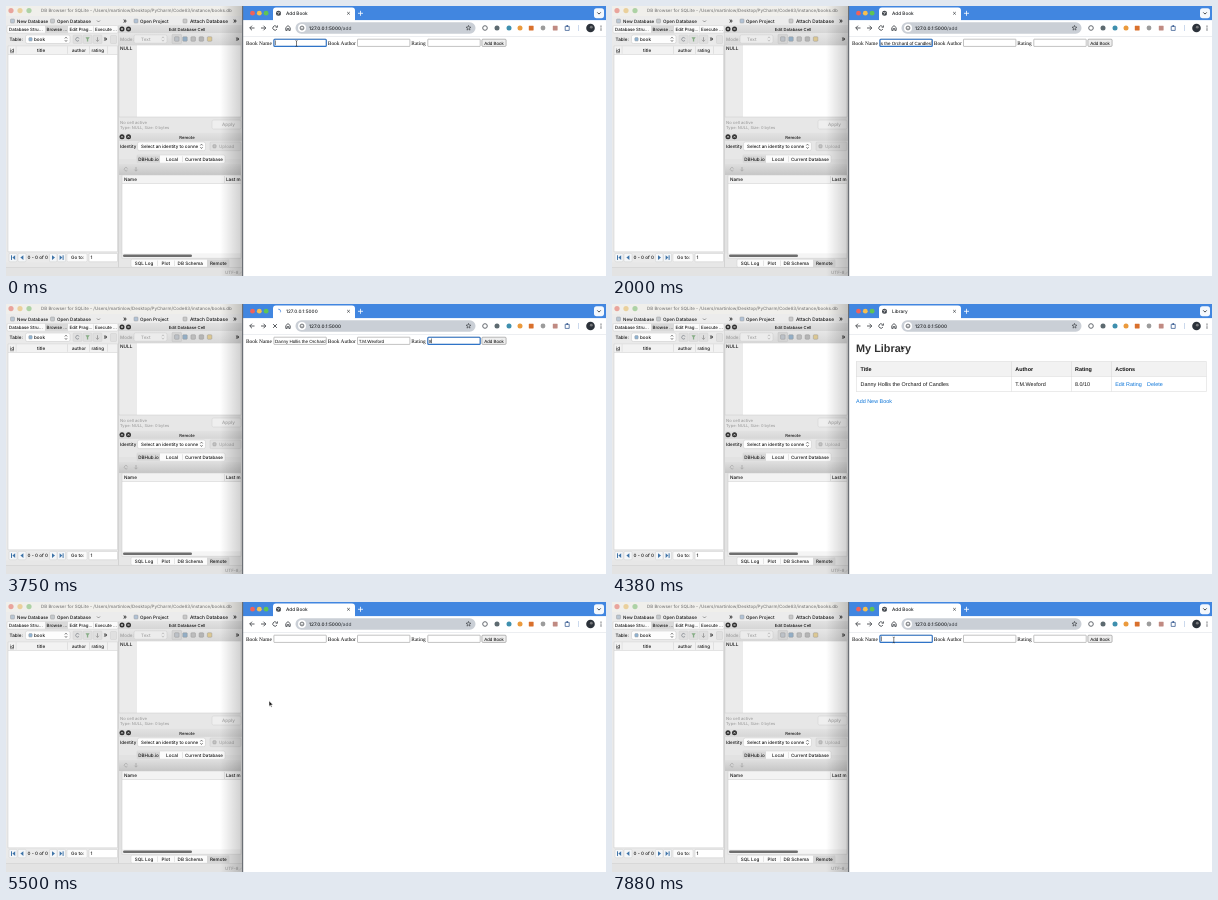
These frames come from a looping animation (600x270 px, 8 s). An HTML page with a canvas:

```html
<!DOCTYPE html>
<html lang="en">
<head>
<meta charset="utf-8">
<title>Add Book</title>
<style>
html, body { margin: 0; width: 100%; height: 100%; overflow: hidden; background: #fff; }
canvas { display: block; width: 600px; height: 270px; }
</style>
</head>
<body>
<canvas id="stage" width="600" height="270"></canvas>
<script>
const ctx = document.getElementById('stage').getContext('2d');
const LOOP = 8000;
const UI = 'Inter, sans-serif';
const ARIAL = '"Liberation Sans", Arial, sans-serif';
const SERIF = '"Liberation Serif", "Times New Roman", serif';

const BOOK = 'Danny Hollis the Orchard of Candles';
const AUTHOR = 'T.M.Wexford';
const HOST = '127.0.0.1:5000';

// Moments of the story, in ms
const T = { author: 2150, rating: 3300, submit: 3640, library: 4020, click: 5450, focus: 6600 };

// ---------- drawing helpers ----------
function rect(x, y, w, h, fill) {
  ctx.fillStyle = fill;
  ctx.fillRect(x, y, w, h);
}

function fade(x0, y0, x1, y1, from, to) {
  const g = ctx.createLinearGradient(x0, y0, x1, y1);
  g.addColorStop(0, from);
  g.addColorStop(1, to);
  return g;
}

function box(x, y, w, h, r, fill, stroke, lw = 0.6) {
  ctx.beginPath();
  ctx.roundRect(x, y, w, h, r);
  if (fill) { ctx.fillStyle = fill; ctx.fill(); }
  if (stroke) { ctx.strokeStyle = stroke; ctx.lineWidth = lw; ctx.stroke(); }
}

function frame(x, y, w, h) {
  ctx.strokeStyle = '#c8c8c8';
  ctx.lineWidth = 0.5;
  ctx.strokeRect(x, y, w, h);
}

function dot(x, y, r, fill) {
  ctx.beginPath();
  ctx.arc(x, y, r, 0, Math.PI * 2);
  ctx.fillStyle = fill;
  ctx.fill();
}

function ring(x, y, r, color, lw = 0.7, from = 0, to = Math.PI * 2) {
  ctx.beginPath();
  ctx.arc(x, y, r, from, to);
  ctx.strokeStyle = color;
  ctx.lineWidth = lw;
  ctx.stroke();
}

function path(points, color, lw = 0.8, fill) {
  ctx.beginPath();
  for (let i = 0; i < points.length; i += 2) ctx.lineTo(points[i], points[i + 1]);
  if (fill) { ctx.closePath(); ctx.fillStyle = fill; ctx.fill(); }
  if (color) { ctx.strokeStyle = color; ctx.lineWidth = lw; ctx.stroke(); }
}

// y is the vertical middle of the capitals; the scaled-down font keeps tiny text in proportion
function text(s, x, y, size = 4.6, color = '#111', family = UI, weight = 500, align = 'left') {
  ctx.save();
  ctx.translate(x, y + size * 0.36);
  ctx.scale(0.1, 0.1);
  ctx.textRendering = 'geometricPrecision';
  ctx.font = `${weight} ${size * 10}px ${family}`;
  ctx.fillStyle = color;
  ctx.textAlign = align;
  ctx.fillText(s, 0, 0);
  const w = ctx.measureText(s).width / 10;
  ctx.restore();
  return w;
}

function centred(s, x, y, size, color) {
  text(s, x, y, size, color, UI, 500, 'center');
}

function widthOf(s, size, family) {
  ctx.font = `${size * 10}px ${family}`;
  return ctx.measureText(s).width / 10;
}

function cross(x, y, r, color, lw) {
  path([x - r, y - r, x + r, y + r], color, lw);
  path([x + r, y - r, x - r, y + r], color, lw);
}

function lights(x, y, r, step, colors) {
  colors.forEach((c, i) => dot(x + i * step, y, r, c));
}

function upDown(x, y, color) {
  path([x - 1.2, y - 0.8, x, y - 2.2, x + 1.2, y - 0.8], color, 0.6);
  path([x - 1.2, y + 0.8, x, y + 2.2, x + 1.2, y + 0.8], color, 0.6);
}

function icon(x, y, color, size = 4.5) {
  box(x - size / 2, y - size / 2, size, size, 0.8, color, '#8c8c8c', 0.4);
}

// ---------- database window ----------
function dbWindow() {
  rect(0, 0, 237, 270, '#e7e7e7');
  rect(0, 0, 237, 10, '#f0efeb');
  lights(5, 4.6, 2.6, 9, ['#e9a49c', '#ead09c', '#add2a5']);
  text('DB Browser for SQLite - /Users/martinlow/Desktop/PyCharm/Code63/instance/books.db', 35, 4.7, 4.5, '#7d7d7d');

  rect(0, 10, 237, 9.5, '#ececec');
  icon(6.5, 15, '#b9c6d3', 4);
  text('New Database', 11, 15.2, 4.5);
  icon(46.5, 15, '#c5c9cc', 4);
  text('Open Database', 51, 15.2);
  path([91, 14.5, 92.5, 16, 94, 14.5], '#555', 0.6);
  text('»', 117, 14.8, 6.5);
  icon(130, 15, '#b2c3d6', 4);
  text('Open Project', 134, 15.2);
  icon(179, 15, '#c9c9c9', 4);
  text('Attach Database', 184, 15.2, 4.8);
  text('»', 227, 14.8, 6.5);

  browsePane();
  cellPane();
  remotePane();

  rect(0, 261.5, 237, 8.5, '#e3e3e3');
  rect(0, 261.2, 237, 0.5, '#cbcbcb');
  text('UTF-8', 219, 266.3, 4.4, '#a0a0a0');
  path([233, 268.5, 236, 265.5], '#bbb', 0.5);

  // shadow cast by the browser window
  rect(214, 0, 23, 270, fade(214, 0, 237, 0, 'rgba(0,0,0,0)', 'rgba(0,0,0,0.2)'));
}

function browsePane() {
  rect(0, 19.5, 112, 237, '#eaeaea');
  box(1, 19.5, 111, 7.6, 1.4, '#fbfbfb', '#cfcfcf', 0.5);
  rect(39, 19.5, 23, 7.6, '#d9d9d9');
  rect(87, 20.5, 0.5, 5.6, '#ccc');
  text('Database Stru...', 3, 23.4, 4.4);
  text('Browse ...', 40.5, 23.4, 4.4);
  text('Edit Prag...', 63.5, 23.4, 4.4);
  text('Execute ...', 89, 23.4, 4.4);

  text('Table:', 3.5, 33.4);
  box(19.5, 29, 44.5, 8.5, 1.8, '#fdfdfd', '#c6c6c6', 0.5);
  icon(24.5, 33.3, '#8fb4d4', 3.4);
  text('book', 28, 33.4);
  upDown(60, 33.3, '#333');
  [71.5, 81.5, 91.5].forEach(x => box(x - 4.5, 29, 9, 8.5, 1, '#dfdfdf', '#cacaca', 0.4));
  ring(71.5, 33.3, 1.8, '#858a90', 0.8, 0.6, 5.8);
  path([79.5, 31.3, 83.7, 31.3, 82.2, 33.2, 82.2, 35.5, 80.9, 35.5, 80.9, 33.2], null, 0, '#86ad85');
  path([91.5, 31.2, 91.5, 35.3], '#a0a0a0', 1);
  path([89.9, 33.8, 91.5, 35.6, 93.1, 33.8], '#a0a0a0', 0.8);
  text('»', 97.5, 33, 6.5);
  box(104.5, 29.5, 6, 8, 1, '#e0e0e0', '#c8c8c8', 0.4);

  rect(2, 39.8, 109.5, 206, '#fff');
  rect(2, 39.8, 109.5, 8.4, '#f2f2f2');
  rect(2, 48, 109.5, 0.5, '#c9c9c9');
  [9.8, 61, 83, 101.5].forEach(x => rect(x, 40.3, 0.5, 7.5, '#cfcfcf'));
  text('id', 4, 44.2);
  rect(4, 46.6, 4, 0.5, '#333');
  text('title', 31, 44.2);
  text('author', 66, 44.2, 4.5);
  text('rating', 85.5, 44.2, 4.5);
  frame(2, 39.8, 109.5, 206);

  [[3, 8], [12, 8], [43.5, 7.5], [51.5, 8]].forEach(([x, w]) => box(x, 247.4, w, 8.4, 1, '#f4f6f8', '#c8c8c8', 0.4));
  const blue = '#3f74a8';
  rect(5, 249.3, 1, 4.6, blue);
  path([9.2, 249.2, 6.4, 251.6, 9.2, 254], null, 0, blue);
  path([17.4, 249.2, 14.4, 251.6, 17.4, 254], null, 0, blue);
  text('0 - 0 of 0', 21.5, 251.6);
  path([46, 249.2, 49, 251.6, 46, 254], null, 0, blue);
  path([53.6, 249.2, 56.3, 251.6, 53.6, 254], null, 0, blue);
  rect(56.6, 249.3, 1, 4.6, blue);
  box(61, 247.4, 20, 8.4, 1.2, '#fafafa', '#cdcdcd', 0.4);
  text('Go to:', 65, 251.6);
  box(83, 247.4, 28.5, 8.4, 0.5, '#fff', '#c6c6c6', 0.5);
  text('1', 84.5, 251.6);
}

function dockTitle(label, y) {
  rect(112.5, y, 124.5, 8, fade(0, y, 0, y + 8, '#e2e2e2', '#d6d6d6'));
  [116, 122.5].forEach(x => {
    dot(x, y + 4, 2.5, '#303030');
    cross(x, y + 4, 0.9, '#fff', 0.6);
  });
  centred(label, 181, y + 4.2, 4.2);
}

function cellPane() {
  rect(112, 19.5, 0.7, 242, '#cbcbcb');
  dockTitle('Edit Database Cell', 19);
  rect(112.5, 27.2, 124.5, 11.6, fade(0, 27, 0, 39, '#e6e6e6', '#d8d8d8'));
  text('Mode:', 114, 33, 4.6, '#9c9c9c');
  box(128, 28.8, 33, 8.4, 1.8, '#ececec', '#cacaca', 0.5);
  text('Text', 135, 33, 4.6, '#a4a4a4');
  upDown(157, 33, '#aaa');
  box(166, 28.3, 9.5, 9.4, 1, '#d4d4d4', '#bcbcbc', 0.4);
  ['#bcc1c7', '#93aec6', '#bdbdbd', '#b5b5b5', '#dcc893'].forEach((c, i) => icon(170.8 + i * 8.2, 33, c));
  text('»', 229.5, 32.8, 6.5);

  rect(113, 39, 122, 72, '#fff');
  rect(113, 39, 18, 72, '#ebebeb');
  frame(113, 39, 122, 72);
  text('NULL', 114, 42.3, 4.7);
  text('No cell active', 114, 116, 4.2, '#a0a0a0');
  text('Type: NULL, Size: 0 bytes', 114, 121.2, 4, '#a0a0a0');
  box(206, 114, 29, 9, 1.5, '#efefef', '#cecece', 0.5);
  centred('Apply', 222.5, 118.7, 4.6, '#a6a6a6');
}

function remotePane() {
  dockTitle('Remote', 126.8);
  text('Identity', 114, 140.3, 4.5);
  box(131.5, 136, 68, 8.6, 1.8, '#fdfdfd', '#c8c8c8', 0.5);
  text('Select an identity to conne', 135, 140.4, 4.5);
  upDown(195.5, 140.3, '#333');
  box(204, 136, 31, 8.6, 1.2, '#e0e0e0', '#cacaca', 0.5);
  icon(208.5, 140.3, '#c4c4c4', 3.2);
  text('Upload', 213, 140.4, 4.5, '#a9a9a9');

  rect(113, 153, 122, 94.5, '#e2e2e2');
  rect(113, 158, 122, 11, fade(0, 158, 0, 169, '#dedede', '#c6c6c6'));
  box(130.5, 149, 88.5, 8.2, 1.5, '#fbfbfb', '#cdcdcd', 0.5);
  rect(131, 149.3, 23, 7.6, '#d7d7d7');
  rect(176, 150.3, 0.5, 5.6, '#ccc');
  centred('DBHub.io', 142.5, 153.2);
  centred('Local', 166, 153.2);
  centred('Current Database', 198, 153.2, 4.5);
  ring(120, 163.2, 1.7, '#a9a9a9', 0.8, 0.6, 5.8);
  path([130, 161, 130, 165], '#a9a9a9', 0.9);
  path([128.5, 163.7, 130, 165.2, 131.5, 163.7], '#a9a9a9', 0.8);

  rect(116, 169, 119, 83, '#fff');
  rect(116, 169, 119, 8.6, '#f3f3f3');
  rect(116, 177.5, 119, 0.5, '#ccc');
  rect(218, 170, 0.5, 7, '#ccc');
  text('Name', 118, 173.4);
  text('Last m', 220, 173.4);
  rect(116, 247.3, 119, 5, '#f5f5f5');
  box(117, 248.5, 69, 2.4, 1.2, '#6e6e6e');
  frame(116, 169, 119, 83.3);

  box(125, 253.2, 98.5, 8, 1.4, '#fbfbfb', '#cdcdcd', 0.5);
  rect(201, 253.5, 22, 7.5, '#d7d7d7');
  [151.5, 168].forEach(x => rect(x, 254.5, 0.5, 5.4, '#ccc'));
  centred('SQL Log', 138, 257.3);
  centred('Plot', 159.8, 257.3);
  centred('DB Schema', 184.3, 257.3);
  centred('Remote', 212.3, 257.3);
}

// ---------- browser ----------
function globe(x, y) {
  dot(x, y, 2.5, '#3a3f45');
  path([x - 1.7, y - 0.8, x + 0.4, y - 0.5, x - 0.5, y + 1.4], '#fff', 0.6);
  path([x + 0.6, y - 1.7, x + 1.7, y + 0.2], '#fff', 0.5);
}

function browserFrame(title, route, loading, t) {
  const ink = '#33373c';
  rect(237, 0, 363, 270, '#fff');
  rect(237, 0, 363, 14.5, '#4186e0');
  lights(246.5, 7.2, 2.4, 6.8, ['#f0625a', '#f6be4f', '#5fc454']);
  box(267, 1.6, 82, 15, 3, '#fff');
  if (loading) {
    const a = t / 160;
    ring(272.5, 7.3, 2.1, '#3f7fd8', 0.8, a, a + 2.2);
  } else {
    globe(272.5, 7.3);
  }
  text(title, 280, 7.4, 4.7, '#1c1f22');
  cross(342.5, 7.3, 1.3, ink, 0.7);
  path([352, 7.3, 357, 7.3], '#fff', 0.8);
  path([354.5, 4.8, 354.5, 9.8], '#fff', 0.8);
  box(588, 2.2, 10, 10, 2.6, '#f4f8fd');
  path([591.3, 6.4, 593, 8.1, 594.7, 6.4], ink, 0.9);

  rect(237, 14.2, 363, 16, '#fff');
  rect(237, 30, 363, 0.6, '#dfe3e8');
  path([248.5, 22, 243.8, 22], ink);
  path([246, 19.7, 243.7, 22, 246, 24.3], ink);
  path([255, 22, 259.7, 22], ink);
  path([257.5, 19.7, 259.8, 22, 257.5, 24.3], ink);
  if (loading) {
    cross(269, 22, 1.9, ink, 0.8);
  } else {
    ring(269, 22, 2.2, ink, 0.8, 0.5, 5.6);
    path([271.5, 19.4, 271.5, 21.3, 269.7, 21.3], ink, 0.7);
  }
  path([279.8, 21.6, 282, 19.6, 284.2, 21.6, 284.2, 24.4, 282.8, 24.4, 282.8, 22.6, 281.2, 22.6, 281.2, 24.4, 279.8, 24.4, 279.8, 21.6], ink, 0.8);

  box(289.5, 16.2, 180, 11.6, 5.8, '#cacfd6');
  dot(296, 22, 4, '#fff');
  ring(296, 22, 1.9, ink, 0.7);
  path([296, 21.7, 296, 23], ink, 0.6);
  const w = text(HOST, 303, 22.2, 4.75, '#15171a');
  text(route, 303 + w, 22.2, 4.75, '#4c5157');
  star(462.5, 22, ink);
  extensions(ink);
}

function extensions(ink) {
  ring(479, 22, 2.3, '#555a60', 0.9);
  dot(491, 22, 2.5, '#5d6a70');
  dot(503, 22, 2.5, '#3e8fae');
  dot(514, 22, 2.5, '#eb9a3c');
  box(522.8, 19.7, 4.8, 4.8, 0.4, '#d9702c');
  dot(537, 22, 2.4, '#9c9c9c');
  box(546.8, 19.7, 4.8, 4.8, 0.4, '#c08a82');
  path([559.2, 20.3, 563.2, 20.3, 563.2, 24.4, 559.2, 24.4, 559.2, 20.3], '#3c5f94', 0.8);
  dot(561.2, 20, 0.9, '#3c5f94');
  rect(572, 19, 0.7, 6, '#b5c9e6');
  dot(584.5, 22, 4.3, '#2c323a');
  dot(585.3, 21.2, 1.4, '#77787b');
  [20.1, 22, 23.9].forEach(y => dot(595, y, 0.6, ink));
}

function star(x, y, color) {
  const p = [];
  for (let i = 0; i <= 10; i++) {
    const r = i % 2 ? 1.1 : 2.6, a = i * Math.PI / 5 - Math.PI / 2;
    p.push(x + r * Math.cos(a), y + r * Math.sin(a));
  }
  path(p, color, 0.6);
}

function field(x, value, focused, caret) {
  const y = 33.2, w = 52.4, h = 7.2, size = 4.53;
  box(x, y, w, h, 0.4, '#fff', '#858585', 0.5);
  if (focused) box(x, y, w, h, 1, null, '#2f74c8', 1.1);
  const tw = widthOf(value, size, ARIAL);
  const shift = focused ? Math.max(0, tw - (w - 2.4)) : 0;
  ctx.save();
  ctx.beginPath();
  ctx.rect(x + 0.8, y, w - 1.6, h);
  ctx.clip();
  text(value, x + 1.2 - shift, y + 3.8, size, '#000', ARIAL, 400);
  if (focused && caret) rect(x + 1.2 + tw - shift, y + 1.2, 0.45, h - 2.4, '#000');
  ctx.restore();
}

function formPage(name, author, rating, focus, caret) {
  const label = (s, x) => text(s, x, 36.9, 5.4, '#000', SERIF, 400);
  label('Book Name', 240);
  field(267.9, name, focus === 0, caret);
  label('Book Author', 321.8);
  field(351.5, author, focus === 1, caret);
  label('Rating', 405.3);
  field(421.8, rating, focus === 2, caret);
  box(475.9, 33.2, 24.2, 7.2, 1, '#efefef', '#777', 0.5);
  text('Add Book', 488, 37, 4.53, '#000', ARIAL, 400, 'center');
}

function libraryPage(hover) {
  const cols = [248.5, 403.3, 463, 503.2];
  const cell = (s, x, y, color = '#111', weight = 400) => text(s, x, y, 5.44, color, ARIAL, weight);
  text('My Library', 244, 43.8, 10.9, '#333', ARIAL, 700);
  rect(244, 57.5, 350, 14.8, '#f2f2f2');
  [57.5, 72.3, 87.3].forEach(y => rect(244, y, 350.4, 0.5, '#d6d6d6'));
  [244, 399, 459, 499, 594].forEach(x => rect(x, 57.5, 0.5, 30, '#d6d6d6'));
  ['Title', 'Author', 'Rating', 'Actions'].forEach((s, i) => cell(s, cols[i], 65.2, '#111', 700));
  [BOOK, AUTHOR, '8.0/10'].forEach((s, i) => cell(s, cols[i], 80));
  const link = '#0b74d8';
  cell('Edit Rating', cols[3], 80, link);
  cell('Delete', 535, 80, link);
  const w = cell('Add New Book', 244, 97.5, link);
  if (hover) {
    rect(244, 100.1, w, 0.5, link);
    box(237, 263.3, 42, 7, [0, 1.5, 0, 0], '#4a8adb');
    text(HOST + '/add', 238, 267.1, 4.4, '#15304f');
  }
}

// ---------- pointer ----------
const START = [290.5, 37.5], LINK = [263, 98.8], ENTRY = [281.8, 38];
const ease = p => p * p * (3 - 2 * p);

function glide(t, from, to, a, b) {
  const p = ease(Math.min(1, Math.max(0, (t - from) / (to - from))));
  return [a[0] + (b[0] - a[0]) * p, a[1] + (b[1] - a[1]) * p];
}

function mouseAt(t) {
  return t < T.click ? glide(t, 4300, 4850, START, LINK) : glide(t, T.click + 60, 6100, LINK, ENTRY);
}

function onLink([x, y]) {
  return x > 244 && x < 280 && y > 94.5;
}

function iBeam(x, y) {
  path([x, y - 2.6, x, y + 2.6], '#222', 0.6);
  path([x - 1.1, y - 3, x, y - 2.5, x + 1.1, y - 3], '#222', 0.5);
  path([x - 1.1, y + 3, x, y + 2.5, x + 1.1, y + 3], '#222', 0.5);
}

function arrow(x, y) {
  path([x, y, x, y + 5.6, x + 1.3, y + 4.4, x + 2.3, y + 6.4, x + 3.2, y + 6, x + 2.3, y + 4.1, x + 4, y + 4, x, y], '#fff', 0.6, '#111');
}

function hand(x, y) {
  path([x - 0.9, y - 2.7, x + 0.1, y - 2.7, x + 0.2, y - 0.4, x + 2.4, y + 0.2, x + 2.2, y + 2.9, x - 0.6, y + 2.9, x - 2.4, y + 0.6, x - 1.8, y, x - 0.9, y + 0.6, x - 0.9, y - 2.7], '#222', 0.6, '#fff');
}

// Hidden while typing, until the mouse moves again
function pointer(t) {
  if (t >= 130 && t < 4300) return;
  const [x, y] = mouseAt(t);
  const overForm = t < 130 || t >= T.click;
  if (!overForm && onLink([x, y])) hand(x, y + 1);
  else if (overForm && y < 41) iBeam(x, y);
  else arrow(x, y);
}

// ---------- timeline ----------
const ramp = (t, a, b, n) => Math.round(n * Math.min(1, Math.max(0, (t - a) / (b - a))));

function browser(t) {
  if (t < T.library) {
    const typed = ramp(t, 90, 870, 12) + ramp(t, 930, 1960, BOOK.length - 12);
    const author = AUTHOR.slice(0, ramp(t, T.author + 70, T.rating - 120, AUTHOR.length));
    const rating = t > T.rating + 130 ? '8' : '';
    const focus = t < T.author ? 0 : t < T.rating ? 1 : 2;
    const loading = t >= T.submit;
    browserFrame(loading ? HOST : 'Add Book', loading ? '' : '/add', loading, t);
    formPage(BOOK.slice(0, typed), author, rating, focus, true);
  } else if (t < T.click) {
    browserFrame('Library', '', false, t);
    libraryPage(onLink(mouseAt(t)));
  } else {
    const since = t - T.focus;
    browserFrame('Add Book', '/add', false, t);
    formPage('', '', '', since >= 0 ? 0 : -1, since % 1000 < 500);
  }
  pointer(t);
}

function draw(now) {
  const t = now % LOOP;
  ctx.clearRect(0, 0, 600, 270);
  ctx.lineJoin = 'round';
  dbWindow();
  browser(t);
  rect(236, 0, 1.2, 270, '#6b6f75');
}

let begin;
function tick(now) {
  begin ??= now;
  draw(now - begin);
  requestAnimationFrame(tick);
}
draw(0);
requestAnimationFrame(tick);
</script>
</body>
</html>
```
